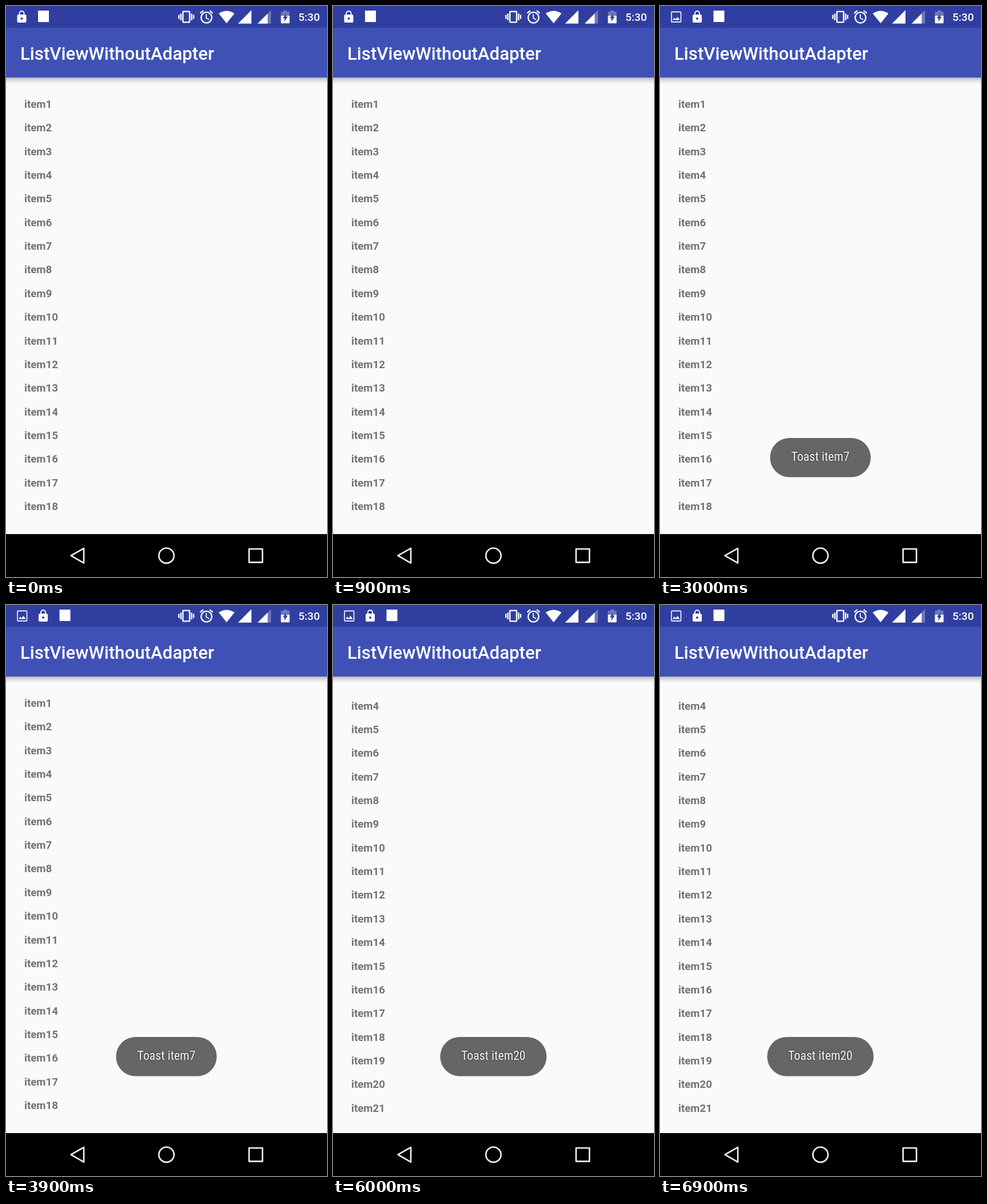
Animation, 561 px wide and 998 px high, one loop 7500 ms. Source, as an HTML page with a canvas:

```html
<!DOCTYPE html>
<html lang="en">
<head>
<meta charset="utf-8">
<title>List with toasts</title>
<style>
  html, body { margin: 0; width: 100%; height: 100%; overflow: hidden; background: #fafafa; }
  canvas { display: block; width: 561px; height: 998px; }
</style>
</head>
<body>
<canvas id="stage"></canvas>
<script>
const W = 561, H = 998, STEP = 1500;
const ROW = 41.35, LIST_TOP = 150, LIST_BOTTOM = 898;
const STATES = [
  { toast: 0, scroll: 0 },
  { toast: 10, scroll: 0 },
  { toast: 7, scroll: 0 },
  { toast: 2, scroll: 0 },
  { toast: 20, scroll: 119.4 }
];

const canvas = document.getElementById('stage');
const ctx = canvas.getContext('2d');
const ratio = window.devicePixelRatio || 1;
canvas.width = Math.round(W * ratio);
canvas.height = Math.round(H * ratio);

// Icons on a 24-unit grid
const ICONS = {
  image: 'M19 4.5v15H5v-15h14m0-1.5H5a1.5 1.5 0 0 0-1.5 1.5v15A1.5 1.5 0 0 0 5 21h14a1.5 1.5 0 0 0 1.5-1.5v-15A1.5 1.5 0 0 0 19 3zM14.1 11.9l-3 3.9L9 13.1 6 17h12z',
  lock: 'M18 8h-1V6A5 5 0 0 0 7 6v2H6a2 2 0 0 0-2 2v10a2 2 0 0 0 2 2h12a2 2 0 0 0 2-2V10a2 2 0 0 0-2-2zM12 17a2 2 0 1 1 0-4 2 2 0 0 1 0 4zM15.1 8H8.9V6a3.1 3.1 0 0 1 6.2 0z',
  vibrate: 'M0 9h2v6H0zM3 7h2v10H3zM22 9h2v6h-2zM19 7h2v10h-2zM16.5 3h-9A1.5 1.5 0 0 0 6 4.5v15A1.5 1.5 0 0 0 7.5 21h9a1.5 1.5 0 0 0 1.5-1.5v-15A1.5 1.5 0 0 0 16.5 3zM16 19H8V5h8z',
  alarm: 'M22 5.7l-4.6-3.8-1.3 1.5 4.6 3.9zM7.9 3.4L6.6 1.9 2 5.7l1.3 1.5zM12.5 8H11v6l4.75 2.85.75-1.2-4-2.4zM12 4a9 9 0 1 0 0 18 9 9 0 0 0 0-18zM12 20a7 7 0 1 1 0-14 7 7 0 0 1 0 14z',
  wifi: 'M12 21.5L23.64 7C23.2 6.66 18.7 3 12 3S.8 6.66.36 7z',
  signal: 'M2 22h20V2z',
  signalPart: 'M17 7L2 22h15z',
  battery: 'M5.6 5.2a1 1 0 0 1 1-1h2.9V2.4h5v1.8h2.9a1 1 0 0 1 1 1v15.3a1 1 0 0 1-1 1H6.600a1 1 0 0 1-1-1z',
  bolt: 'M13.2 7v4.6h2.5L10.8 19v-5.200H8.3z'
};
const PATHS = {};
for (const name in ICONS) PATHS[name] = new Path2D(ICONS[name]);

function icon(name, x, y, scale = 1.17, color = '#fff') {
  ctx.save();
  ctx.translate(x, y);
  ctx.scale(scale, scale);
  ctx.fillStyle = color;
  ctx.fill(PATHS[name], 'evenodd');
  ctx.restore();
}

function rect(x, y, w, h, color) {
  ctx.fillStyle = color;
  ctx.fillRect(x, y, w, h);
}

function text(str, x, y, font, color) {
  ctx.font = font;
  ctx.fillStyle = color;
  ctx.fillText(str, x, y);
}

function drawStatusBar(hasImage) {
  rect(0, 0, W, 38, '#303f9f');
  const dx = hasImage ? 37.5 : 0;
  if (hasImage) icon('image', 15.6, 6.4, 1.06);
  icon('lock', 15.5 + dx, 7, 1);
  rect(56 + dx, 8, 19, 20, '#fff');

  icon('vibrate', 301, 5);
  icon('alarm', 336.3, 5);
  icon('wifi', 371.5, 5);
  icon('signal', 403.2, 5);
  icon('signal', 437.4, 5, 1.17, 'rgba(255,255,255,.3)');
  icon('signalPart', 437.4, 5);

  icon('battery', 474, 5, 1.17, 'rgba(255,255,255,.3)');
  ctx.save();
  ctx.beginPath();
  ctx.rect(474, 17, 28, 16);
  ctx.clip();
  icon('battery', 474, 5);
  ctx.restore();
  icon('bolt', 474, 5, 1.17, '#303f9f');

  text('5:30', 511, 26, '500 19px Roboto, sans-serif', '#fff');
}

function drawToolbar() {
  const shade = ctx.createLinearGradient(0, 125, 0, 138);
  shade.addColorStop(0, 'rgba(0,0,0,.27)');
  shade.addColorStop(.3, 'rgba(0,0,0,.14)');
  shade.addColorStop(.65, 'rgba(0,0,0,.04)');
  shade.addColorStop(1, 'rgba(0,0,0,0)');
  rect(0, 125, W, 13, shade);
  rect(0, 38, W, 87, '#3f51b5');
  text('ListViewWithoutAdapter', 25, 94, '500 31.17px Roboto, sans-serif', '#fff');
}

function drawList(scroll) {
  ctx.save();
  ctx.beginPath();
  ctx.rect(0, LIST_TOP, W, LIST_BOTTOM - LIST_TOP);
  ctx.clip();
  const first = Math.floor(scroll / ROW);
  for (let i = first; i * ROW - scroll < LIST_BOTTOM - LIST_TOP; i++) {
    text('item' + (i + 1), 32, 178 + i * ROW - scroll, 'bold 18.7px Roboto, sans-serif', '#737373');
  }
  ctx.restore();
}

function drawToast(n) {
  const label = 'Toast item' + n;
  ctx.save();
  ctx.font = 'condensed 21.8px "Roboto Condensed", Roboto, sans-serif';
  // Tighter setting where no condensed face is installed
  if (ctx.measureText('Toast item10').width > 114) {
    ctx.font = '20px Roboto, sans-serif';
    ctx.letterSpacing = '-0.5px';
  }
  const w = n > 9 ? 186 : 176;
  ctx.fillStyle = '#666';
  ctx.beginPath();
  ctx.roundRect(280.3 - w / 2, 755, w, 68.500, 34.2);
  ctx.fill();
  ctx.textAlign = 'center';
  ctx.shadowColor = 'rgba(0,0,0,.6)';
  ctx.shadowBlur = 3;
  ctx.fillStyle = '#f4f4f4';
  ctx.fillText(label, 280.3, 795);
  ctx.restore();
}

function drawNavBar() {
  rect(0, 923, W, 75, '#000');
  ctx.strokeStyle = '#f2f2f2';
  ctx.lineWidth = 2.6;
  ctx.lineJoin = 'round';
  ctx.beginPath();
  ctx.moveTo(113.5, 960.7);
  ctx.lineTo(136, 947.8);
  ctx.lineTo(136, 973.6);
  ctx.closePath();
  ctx.stroke();
  ctx.beginPath();
  ctx.arc(280.4, 960.7, 13.2, 0, Math.PI * 2);
  ctx.stroke();
  ctx.strokeRect(424.8, 949, 23.4, 23.4);
}

function draw(time) {
  const { toast, scroll } = STATES[Math.floor(time / STEP) % STATES.length];
  ctx.setTransform(ratio, 0, 0, ratio, 0, 0);
  rect(0, 0, W, H, '#fafafa');
  drawList(scroll);
  drawToolbar();
  drawStatusBar(toast > 0);
  if (toast) drawToast(toast);
  drawNavBar();
}

let start = null;
function tick(now) {
  if (start === null) start = now;
  draw(now - start);
  requestAnimationFrame(tick);
}
draw(0);
requestAnimationFrame(tick);
</script>
</body>
</html>
```
